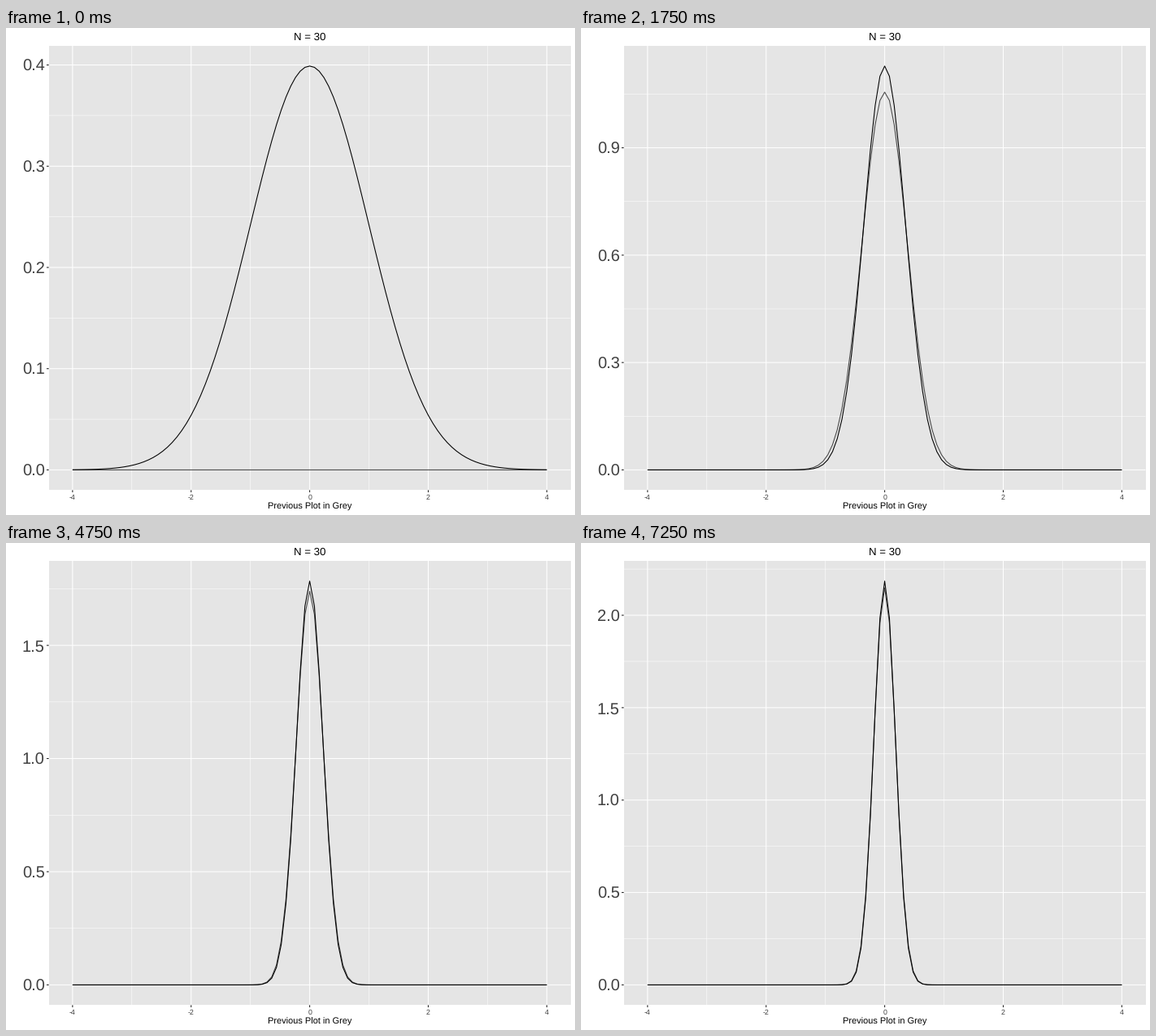
A matplotlib script for the animation above (7500 ms loop, 700x600 px).

```python
import math

import matplotlib.pyplot as plt
import numpy as np
from matplotlib.animation import FuncAnimation
from matplotlib.patches import Rectangle

W, H, DPI = 700, 600, 100
FRAMES, INTERVAL = 30, 250
PX = 72 / DPI  # points per pixel

TOP, BOTTOM, RIGHT = 22.0, 569.3, 694.5
LABEL_LEFT, DIGIT = 19.8, 11.12
PANEL, INK, TICK, PREVIOUS = "#e5e5e5", "#404040", "#262626", "#484848"

plt.rcParams.update({
    "font.family": "Liberation Sans",
    "text.hinting": "none",
    "path.simplify": False,
})

fig = plt.figure(figsize=(W / DPI, H / DPI), dpi=DPI, facecolor="white")
ax = fig.add_axes([0, 0, 1, 1])
xs = np.linspace(-4, 4, 101)


def density(n):
    """Density of the mean of n standard normal draws."""
    return math.sqrt(n / (2 * math.pi)) * np.exp(-n * xs ** 2 / 2)


def nice_breaks(low, high, want=5):
    """Extended Wilkinson breaks from zero, for the range low to high."""
    nice = (1, 5, 2, 2.5, 4, 3)
    best, pick = -math.inf, None
    for rank, q in enumerate(nice):
        for power in (-2, -1, 0):
            step = q * 10 ** power
            for count in range(2, 13):
                last = step * (count - 1)
                simple = 1 - rank / (len(nice) - 1)
                miss = (high - last) ** 2 + low ** 2
                cover = 1 - 0.5 * miss / (0.1 * (high - low)) ** 2
                span = max(last, high) - low
                ratio = (count - 1) / last * span / (want - 1)
                dense = 2 - max(ratio, 1 / ratio)
                score = 0.25 * simple + 0.2 * cover + 0.5 * dense
                if score > best + 1e-12:
                    best, pick = score, (step, count)
    return pick


def line(x, y, color, width):
    ax.plot(x, y, color=color, lw=width * PX, solid_capstyle="butt",
            solid_joinstyle="round", snap=False)


def write(x, y, text, size, color, align="center"):
    ax.text(x, y, text, fontsize=size * PX, color=color, ha=align,
            va="baseline")


def draw(frame):
    n = frame + 1
    curve = density(n)
    top = curve.max()
    low, high = -0.05 * top, 1.05 * top
    step, count = nice_breaks(low, high)
    majors = [i * step for i in range(count) if i * step <= high]
    minors = [(i + 0.5) * step for i in range(count + 1)
              if (i + 0.5) * step <= high]
    places = 1 if abs(step * 10 - round(step * 10)) < 1e-9 else 2
    left = LABEL_LEFT + DIGIT * (places + 1.5) + 5.1
    middle = (left + RIGHT) / 2

    def to_x(v):
        return middle + v * (RIGHT - left) / 8.8

    def to_y(v):
        return BOTTOM - (v - low) / (high - low) * (BOTTOM - TOP)

    ax.clear()
    ax.set_xlim(0, W)
    ax.set_ylim(H, 0)
    ax.axis("off")
    ax.add_patch(Rectangle((left, TOP), RIGHT - left, BOTTOM - TOP,
                           facecolor=PANEL, lw=0))

    # Grid, thin lines first
    for width, rows, cols in ((0.53, minors, (-3, -1, 1, 3)),
                              (1.07, majors, (-4, -2, 0, 2, 4))):
        for v in rows:
            line([left, RIGHT], [to_y(v)] * 2, "white", width)
        for v in cols:
            line([to_x(v)] * 2, [TOP, BOTTOM], "white", width)

    line(to_x(xs), to_y(density(n - 1)), PREVIOUS, 1.07)
    line(to_x(xs), to_y(curve), "black", 1.07)

    # Ticks and labels
    for v in majors:
        y = to_y(v)
        line([left - 2.75, left], [y, y], TICK, 1.07)
        write(left - 5, y + 7.5, f"{v:.{places}f}", 20, INK, "right")
    for v in (-4, -2, 0, 2, 4):
        x = to_x(v)
        line([x, x], [BOTTOM, BOTTOM + 2.75], TICK, 1.07)
        write(x, 581, str(v), 8.8, INK)

    write(middle, 15, "N = 30", 13.2, "black")
    write(middle, 593, "Previous Plot in Grey", 11, "black")
    return []


anim = FuncAnimation(fig, draw, frames=FRAMES, init_func=lambda: [],
                     interval=INTERVAL, repeat=True, repeat_delay=0)
plt.show()
```
